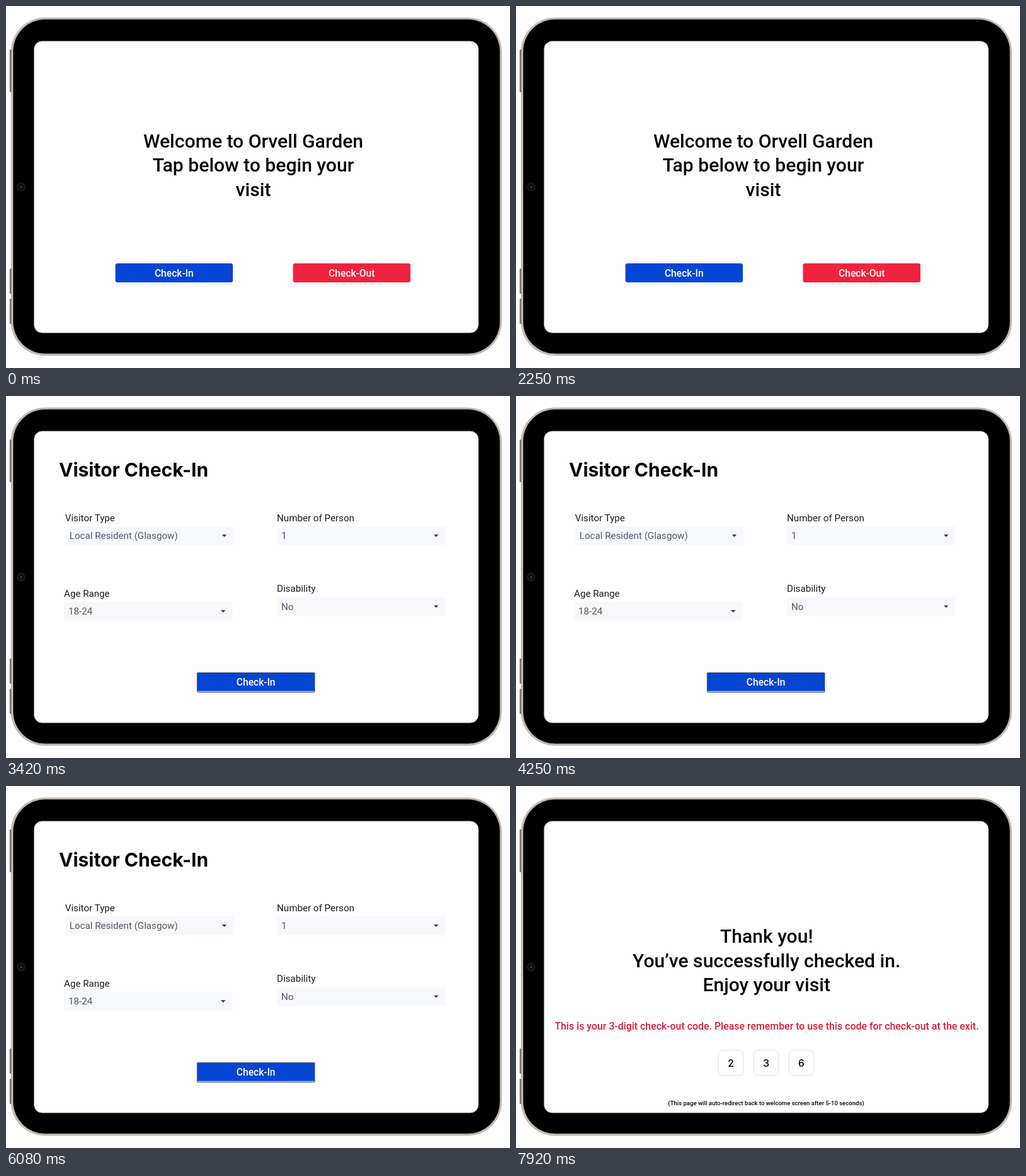
Animation of 800x575 px, one loop 8 s. Source, as an HTML page:

```html
<!DOCTYPE html>
<html lang="en">
<head>
<meta charset="utf-8">
<title>Visitor check-in kiosk</title>
<style>
  html, body { margin: 0; width: 100%; height: 100%; overflow: hidden; background: #fefefe; }
  svg { display: block; width: 100vw; height: 100vh; }
  text { font-family: Roboto, "Noto Sans", sans-serif; fill: #060606; }
  .mid { text-anchor: middle; }
  .big { font-size: 30.1px; font-weight: 500; }
  .btn { font-size: 15.6px; font-weight: 500; fill: #fff; }
  .title { font: 700 30px Inter, sans-serif; }
  .label { font-size: 15.15px; fill: #1c1c1e; }
  .value { font-size: 15.15px; fill: #55566a; }
  .note { font-size: 15.9px; font-weight: 500; fill: #d6213f; }
  .digit { font: 500 15.5px Inter, sans-serif; }
  .small { font-size: 9.55px; font-weight: 500; }
</style>
</head>
<body>
<svg id="stage" viewBox="0 0 800 575" xmlns="http://www.w3.org/2000/svg"></svg>
<script>
const LOOP = 8000;
const BLUE = '#0545d4', RED = '#f0233f';

const rect = (x, y, w, h, r, fill, extra = '') =>
  `<rect x="${x}" y="${y}" width="${w}" height="${h}" rx="${r}" fill="${fill}" ${extra}/>`;
const text = (x, y, cls, str) => `<text x="${x}" y="${y}" class="${cls}">${str}</text>`;
const lines = (x, y, list) =>
  list.map((s, i) => text(x, y + i * 38.6, 'big mid', s)).join('');
const group = (id, body) => `<g id="${id}">${body}</g>`;

const button = (x, fill, label) =>
  rect(x, 408.7, 186.5, 30.3, 3.5, fill) + text(x + 93.2, 429.7, 'btn mid', label);

// Labelled drop-down whose box starts at (x, y)
const field = (x, y, label, value) =>
  text(x, y - 8.5, 'label', label) +
  rect(x, y, 267.5, 29.5, 1, '#f7f8fc') +
  text(x + 7, y + 20.4, 'value', value) +
  `<path d="M${x + 249} ${y + 12.9}h7.4l-3.7 4z" fill="#3c3d48"/>`;

const digit = (x, n) =>
  rect(x - 19.8, 419.7, 39.6, 40.2, 7.5, '#fefefe', 'stroke="#e2e2e4"') +
  text(x, 445.8, 'digit mid', n);

const tablet =
  [[69, 68], [417, 40], [465, 40]].map(([y, h]) => rect(5.8, y, 3.4, h, 1.2, '#77736d')).join('') +
  rect(8.4, 18.9, 778, 536, 53, '#c9c3ba', 'stroke="#98938b" stroke-width=".7"') +
  rect(11.5, 21.4, 772.3, 530.6, 50.5, '#000', 'stroke="#3b3937" stroke-width=".8"') +
  '<circle cx="24" cy="287.6" r="7" fill="#171717"/>' +
  '<circle cx="24" cy="287.6" r="4" fill="#0b0b0c"/>' +
  '<circle cx="24" cy="287.6" r="1.6" fill="#454548"/>' +
  rect(44.4, 55.8, 705.6, 463.4, 13, '#fefefe', 'stroke="#777" stroke-width=".5"');

const welcome =
  lines(392.5, 224.7, ['Welcome to Orvell Garden', 'Tap below to begin your', 'visit']) +
  button(173.6, BLUE, 'Check-In') +
  button(455.5, RED, 'Check-Out');

const form =
  text(84, 127.6, 'title', 'Visitor Check-In') +
  field(93.8, 207, 'Visitor Type', 'Local Resident (Glasgow)') +
  field(430, 207, 'Number of Person', '1') +
  field(92, 327, 'Age Range', '18-24') +
  field(430, 319.7, 'Disability', 'No') +
  rect(303.4, 439.5, 186.6, 31, 1, BLUE, 'stroke="#33405f" stroke-width=".8"') +
  rect(303.8, 468.8, 185.8, 1, 0, '#fff') +
  text(396.7, 460.3, 'btn mid', 'Check-In');

const thanks =
  lines(397.7, 249.2, ['Thank you!', 'You’ve successfully checked in.', 'Enjoy your visit']) +
  text(398, 387.3, 'note mid', 'This is your 3-digit check-out code. Please remember to use this code for check-out at the exit.') +
  digit(341, 2) + digit(397, 3) + digit(453, 6) +
  text(397, 507.4, 'small mid', '(This page will auto-redirect back to welcome screen after 5-10 seconds)');

const screens = [
  { id: 'welcome', from: 0, body: welcome },
  { id: 'form', from: 2420, body: form },
  { id: 'thanks', from: 6830, body: thanks },
];

const stage = document.getElementById('stage');
stage.innerHTML = tablet + screens.map(s => group(s.id, s.body)).join('');
const nodes = screens.map(s => document.getElementById(s.id));

function draw(t) {
  nodes.forEach((node, i) => {
    const end = i + 1 < screens.length ? screens[i + 1].from : LOOP;
    const shown = t >= screens[i].from && t < end;
    node.setAttribute('display', shown ? 'inline' : 'none');
  });
}

function tick() {
  draw(performance.now() % LOOP);
  requestAnimationFrame(tick);
}
draw(0);
requestAnimationFrame(tick);
</script>
</body>
</html>
```
